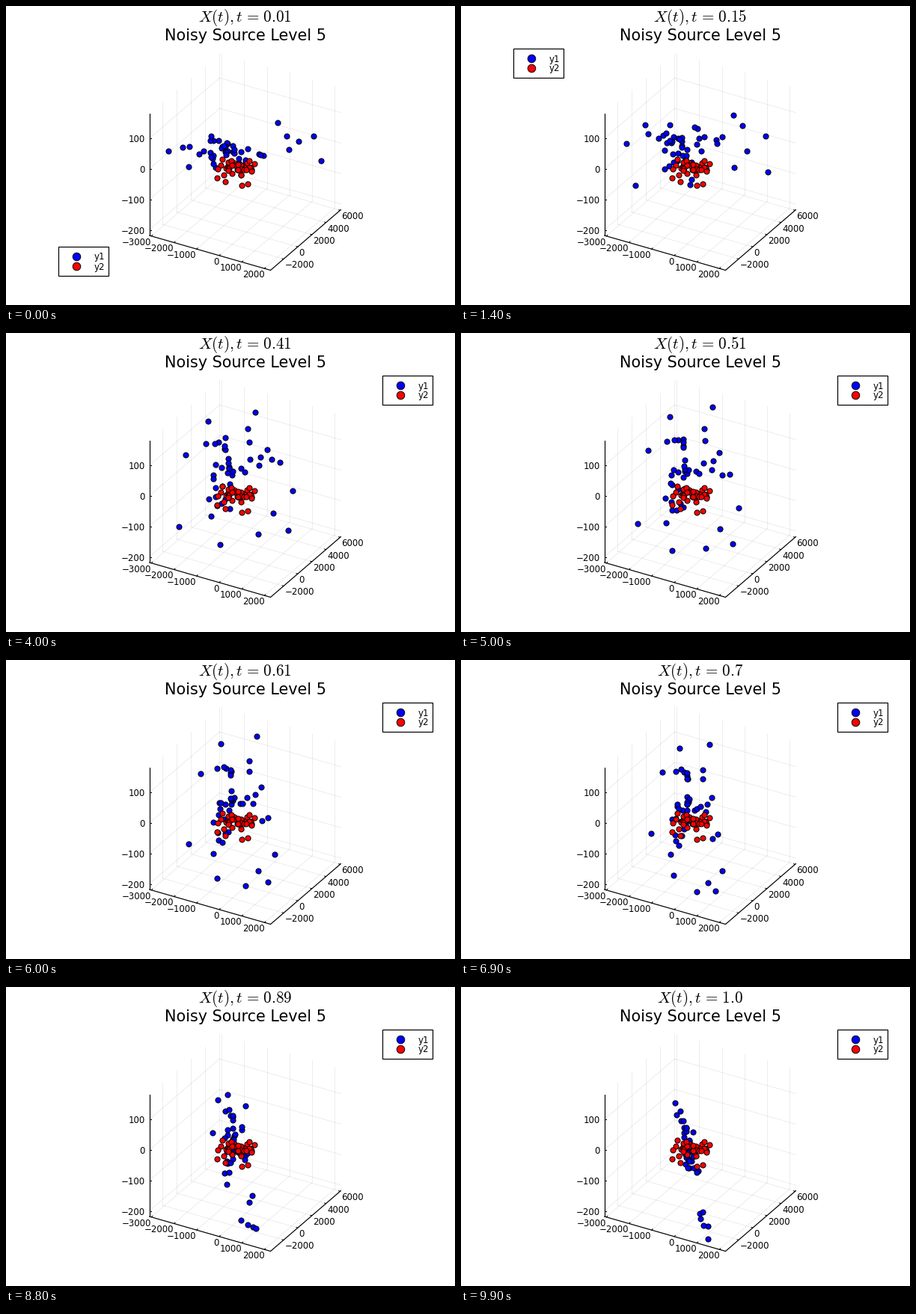
A matplotlib script that plays this animation: 600x400 px, repeating every 10000 ms.

```python
import numpy as np
import matplotlib.pyplot as plt
from matplotlib.animation import FuncAnimation
from matplotlib.patches import Rectangle

plt.rcParams["font.family"] = "DejaVu Sans"
plt.rcParams["mathtext.fontset"] = "cm"

PX = 0.72  # points per pixel at 100 dpi
FRAMES = 100
BLUE, RED = "#0000ff", "#ff0000"

rng = np.random.default_rng(5)

# Outer particles: start x, start y and vertical swing. The rest are random.
OUTER = [(218, 195, -20), (236, 192, -72), (245, 214, 67), (245, 190, -43),
         (422, 207, 22), (412, 175, -20), (392, 181, 16), (379, 191, 46),
         (363, 158, -44), (375, 176, -50), (321, 207, 72), (303, 214, -113)]
INNER = rng.normal((302, 197, -8), (22, 12, 38), (37, 3))
x0, y0, swing = np.vstack([OUTER, INNER]).T

# Still cluster: its rim, then a random filling.
RIM = [(282, 230), (283, 218), (289, 205), (332, 211),
       (293, 235), (315, 240), (323, 238)]
FILL = rng.normal((309, 216), (12, 5.5), (33, 2)).clip((284, 207), (328, 231))


def positions(t):
    """Tilted rotation that turns the wide cloud towards the cluster."""
    c, s = np.cos(3 * t), np.sin(3 * t)
    dx, dy = x0 - 307, y0 - 214
    x = 307 + dx * (0.61 + 0.39 * c) - (0.35 * swing + 8) * s
    y = 214 + dx * 0.42 * (1 - c) + dy * c + swing * s
    return x, y


fig = plt.figure(figsize=(6, 4), dpi=100, facecolor="white")
ax = fig.add_axes([0, 0, 1, 1])
ax.set_xlim(0.5, 600.5)
ax.set_ylim(400.5, 0.5)
ax.axis("off")

# Box corner and edge vectors in screen space
CORNER = np.array([192.0, 307.5])
EX = np.array([162.0, 46.5])
EY = np.array([94.0, -81.0])
EZ = np.array([0.0, -163.5])


def line(p, q, **kw):
    ax.plot([p[0], q[0]], [p[1], q[1]], color="black", **kw)


def label(x, y, s, size=11.8, va="center_baseline", **kw):
    return ax.text(x, y, s, fontsize=size * PX, color="black", va=va, **kw)


def number(v):
    return str(v).replace("-", "\u2212")


def grid(p, *steps):
    for step in steps:
        line(p, p + step, alpha=0.1, lw=0.5, zorder=1)
        p = p + step


def axis(p, step):
    line(p, p + step, lw=1.2 * PX, zorder=2, solid_capstyle="round")


def tick(p, direction):
    line(p, p + direction / np.hypot(*direction) * 2, lw=PX, zorder=2)


for v in range(-3000, 2001, 1000):
    p = CORNER + EX * (v + 3090) / 5360
    grid(p, EY, EZ)
    tick(p, EY)
    label(p[0], p[1] + 7, number(v), ha="right")

for v in range(-2000, 6001, 2000):
    p = CORNER + EY * (v + 3850) / 9950
    grid(p + EX, -EX, EZ)
    tick(p + EX, -EX)
    label(p[0] + EX[0] + 1.5, p[1] + EX[1] + 7, number(v), ha="left")

for v in range(-200, 101, 100):
    p = np.array([CORNER[0], 218.5 - 0.408 * v])
    grid(p, EY, EX)
    tick(p, EX * [1, 0])
    label(186, p[1], number(v), ha="right")

axis(CORNER, EZ)
axis(CORNER, EX)
axis(CORNER + EX, EY)

label(320.5, 46.5, "Noisy Source Level 5", 20.8, "baseline", ha="center")
title = label(320, 21.7, "", 21.1, "baseline", ha="center")


def dots(x, y, color, size=7.1, z=3):
    return ax.plot(x, y, "o", ms=size * PX, mfc=color, mec="black",
                   mew=PX, zorder=z)[0]


cloud = dots(*positions(0), BLUE)
dots(*np.vstack([FILL, RIM]).T, RED, z=4)

frame = Rectangle((0, 0), 67, 39, fc="white", ec="black", lw=1.2 * PX, zorder=6)
ax.add_patch(frame)
entries = [(dots([0], [0], color, 10.5, 7), label(0, 0, name, zorder=7), dy)
           for name, color, dy in (("y1", BLUE, 13), ("y2", RED, 26))]


def place_legend(x, y):
    frame.set_xy((x, y))
    for mark, text, dy in entries:
        mark.set_data([x + 24], [y + dy])
        text.set_position((x + 48, y + dy))


def update(i):
    t = (i + 1) / FRAMES
    cloud.set_data(*positions(t))
    title.set_text(rf"$X(t), t\hspace{{0.12}}=\hspace{{0.12}}{t}$")
    place_legend(70 if i < 26 else 503, 322 if i < 5 else 57)
    return []


anim = FuncAnimation(fig, update, frames=FRAMES, interval=100,
                     repeat=True, repeat_delay=0, blit=False)
plt.show()
```
